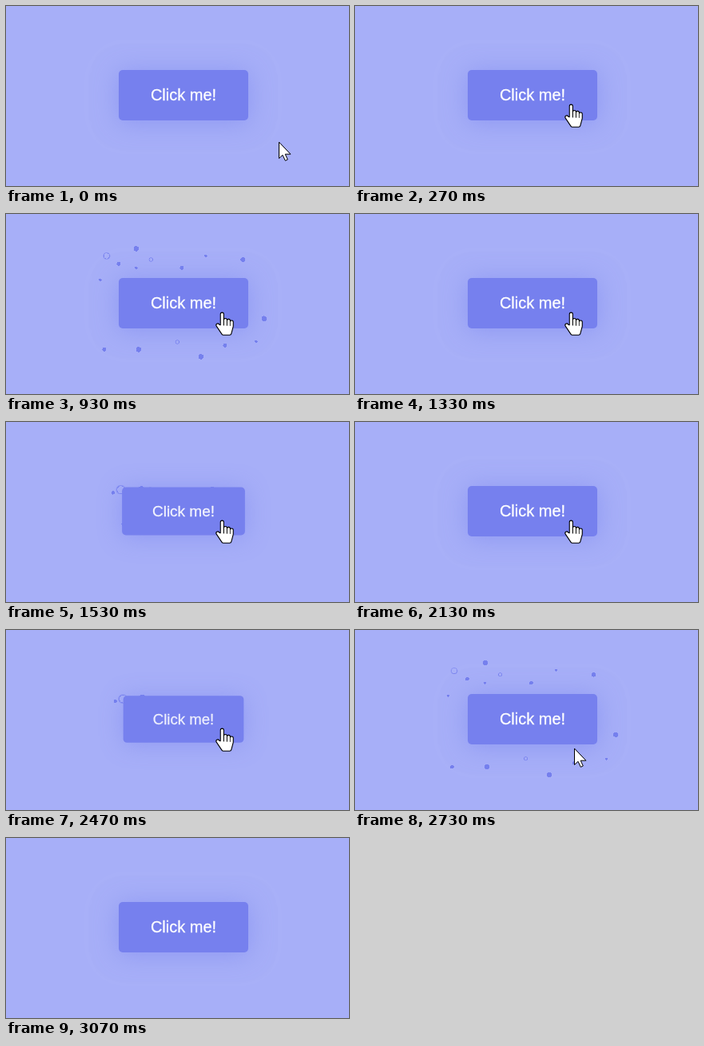
Write an HTML page that moves like this. It is 429 px wide and 225 px high and loops after 3390 ms.

```html
<!DOCTYPE html>
<html lang="en">
<head>
<meta charset="utf-8">
<title>Bubbly button</title>
<style>
  :root { --ink: #7680ee; }
  html, body {
    margin: 0;
    width: 100%;
    height: 100%;
    overflow: hidden;
    background: #a7aff8;
  }
  .halo {
    position: absolute;
    left: 98px;
    top: 42px;
    width: 247px;
    height: 143px;
    box-sizing: border-box;
    border: 5px solid rgba(255, 255, 255, .015);
    border-radius: 52px;
  }
  .button {
    --press: 0;
    --dim: 0;
    --age: 0ms;
    position: absolute;
    left: 141px;
    top: 80px;
    width: 162px;
    height: 63px;
    transform: scale(calc(1 - .1 * var(--press)));
  }
  .face {
    position: absolute;
    inset: 0;
    border-radius: 5px;
    background: var(--ink);
    box-shadow: 0 2.5px 31px rgba(116, 127, 238, calc(.5 - .3 * var(--dim)));
    color: rgba(255, 255, 255, calc(1 - .2 * var(--press)));
    font: 20px/63px "Liberation Sans", Arial, sans-serif;
    -webkit-text-stroke: .3px;
    text-align: center;
  }
  /* Each bubble is one background tile in a band above or below the face. */
  .bubble {
    position: absolute;
    left: -20%;
    top: calc(75% * var(--side));
    width: 140%;
    height: 100%;
    background: var(--look) no-repeat;
    background-size: var(--size) var(--size);
    animation: fly 750ms ease-in-out calc(-1 * var(--age)) both paused;
    visibility: hidden;
  }
  .burst .bubble { visibility: visible; }
  .dot { --look: radial-gradient(circle, var(--ink) 20%, transparent 20%); }
  .ring { --look: radial-gradient(circle, transparent 20%, var(--ink) 20%, transparent 30%); }
  .thin { --look: radial-gradient(circle, transparent 10%, var(--ink) 15%, transparent 20%); }
  /* Size has no middle stop, so it shrinks over the whole run. */
  @keyframes fly {
    0% { background-position: var(--from) calc(40% - 50% * var(--side)); }
    50% { background-position: var(--x) var(--y); }
    100% {
      background-position: var(--x) calc(var(--y) + 10% * var(--side));
      background-size: 0% 0%;
    }
  }
  .cursor {
    position: absolute;
    left: 0;
    top: 0;
    overflow: visible;
    stroke-linejoin: round;
    stroke-linecap: round;
  }
</style>
</head>
<body>
<div class="halo"></div>
<div class="button"><div class="face">Click me!</div></div>
<svg class="cursor" width="24" height="31">
  <defs>
    <path id="fingers" d="M8.3 3.2V18M12.4 10.6V18M16.4 11.4V18M20.2 13V18M2.9 17L9.8 27.2H17.8L20.2 18"/>
  </defs>
  <path id="arrow" fill="#fff" stroke="#000" d="M.5 .5V20.5L5 16.3L8.3 23.3L11.3 21.9L8.2 15.2H14.5Z"/>
  <g id="hand" transform="translate(-8 -1)">
    <use href="#fingers" fill="#000" stroke="#000" stroke-width="5.2"/>
    <use href="#fingers" fill="#fff" stroke="#fff" stroke-width="3"/>
  </g>
</svg>
<script>
  const LOOP = 3390, TICK = 1000 / 15;
  const LAG = 15, BURST = 625;
  const ABOVE = -1, BELOW = 1;
  const clicks = [[600, 635], [1340, 1468], [2290, 2418]];

  // Where bubbles of each kind pass halfway, in percent of their band.
  const kinds = [
    { look: 'dot', size: 10, above: [[0, 80], [22, 50], [65, 20]], below: [[95, 60]] },
    { look: 'dot', size: 15, above: [[10, 40], [50, 50]], below: [[0, 80], [75, 70]] },
    { look: 'dot', size: 18, above: [[90, 30]], below: [] },
    { look: 'dot', size: 20, above: [[20, 0]], below: [[20, 80], [60, 100], [105, 0]] },
    { look: 'thin', size: 18, above: [[30, 30]], below: [[45, 60]] },
    { look: 'ring', size: 20, above: [[0, 20]], below: [] }
  ];

  const find = s => document.querySelector(s);
  const button = find('.button'), halo = find('.halo'), cursor = find('.cursor');
  const arrow = find('#arrow'), hand = find('#hand');

  const clamp = x => Math.min(1, Math.max(0, x));
  const easeIn = x => clamp(x) ** 1.67;
  const smooth = x => x * x * (3 - 2 * x);
  const mix = (a, b, k) => a + (b - a) * k;

  function addBubble(look, size, side, [x, y]) {
    const from = side === ABOVE ? 5 + .72 * x : Math.min(x + 10, 80);
    const el = document.createElement('div');
    el.className = 'bubble ' + look;
    el.style.setProperty('--side', side);
    for (const [name, value] of Object.entries({ size, from, x, y }))
      el.style.setProperty('--' + name, value + '%');
    button.prepend(el);
  }

  for (const { look, size, above, below } of kinds) {
    above.forEach(p => addBubble(look, size, ABOVE, p));
    below.forEach(p => addBubble(look, size, BELOW, p));
  }

  // How far a pressed style has gone, with a shortened way back.
  function pressed(t, [down, up], ms) {
    if (t < up) return easeIn((t - down) / ms);
    const depth = easeIn((up - down) / ms);
    return depth * (1 - easeIn((t - up) / (ms * depth)));
  }

  function tip(t) {
    if (t < 2670) {
      const k = smooth(clamp(t / 267));
      return [mix(341, 270, k), mix(170, 123, k)];
    }
    const k = ((t - 2670) / 220) ** 1.2;
    return [270 + 18 * k, 123 + 110 * k];
  }

  function draw(t) {
    const click = clicks.findLast(([down]) => t >= down) || clicks[0];
    const age = t - click[1] - LAG;
    const dim = pressed(t, click, 250);
    button.style.setProperty('--press', pressed(t, click, 100));
    button.style.setProperty('--dim', dim);
    button.style.setProperty('--age', Math.max(0, age) + 'ms');
    button.classList.toggle('burst', age >= 0 && age < BURST);
    halo.style.opacity = clamp(1 - 12 * dim);

    const [x, y] = tip(t);
    const over = x < 303 && y < 143;
    cursor.style.transform = `translate(${Math.round(x)}px, ${Math.round(y)}px)`;
    cursor.style.display = y < 225 ? '' : 'none';
    hand.style.display = over ? '' : 'none';
    arrow.style.display = over ? 'none' : '';
  }

  const start = performance.now();
  function frame() {
    const t = (performance.now() - start) % LOOP;
    draw(Math.floor((t + 5) / TICK) * TICK);
    requestAnimationFrame(frame);
  }
  frame();
</script>
</body>
</html>
```
